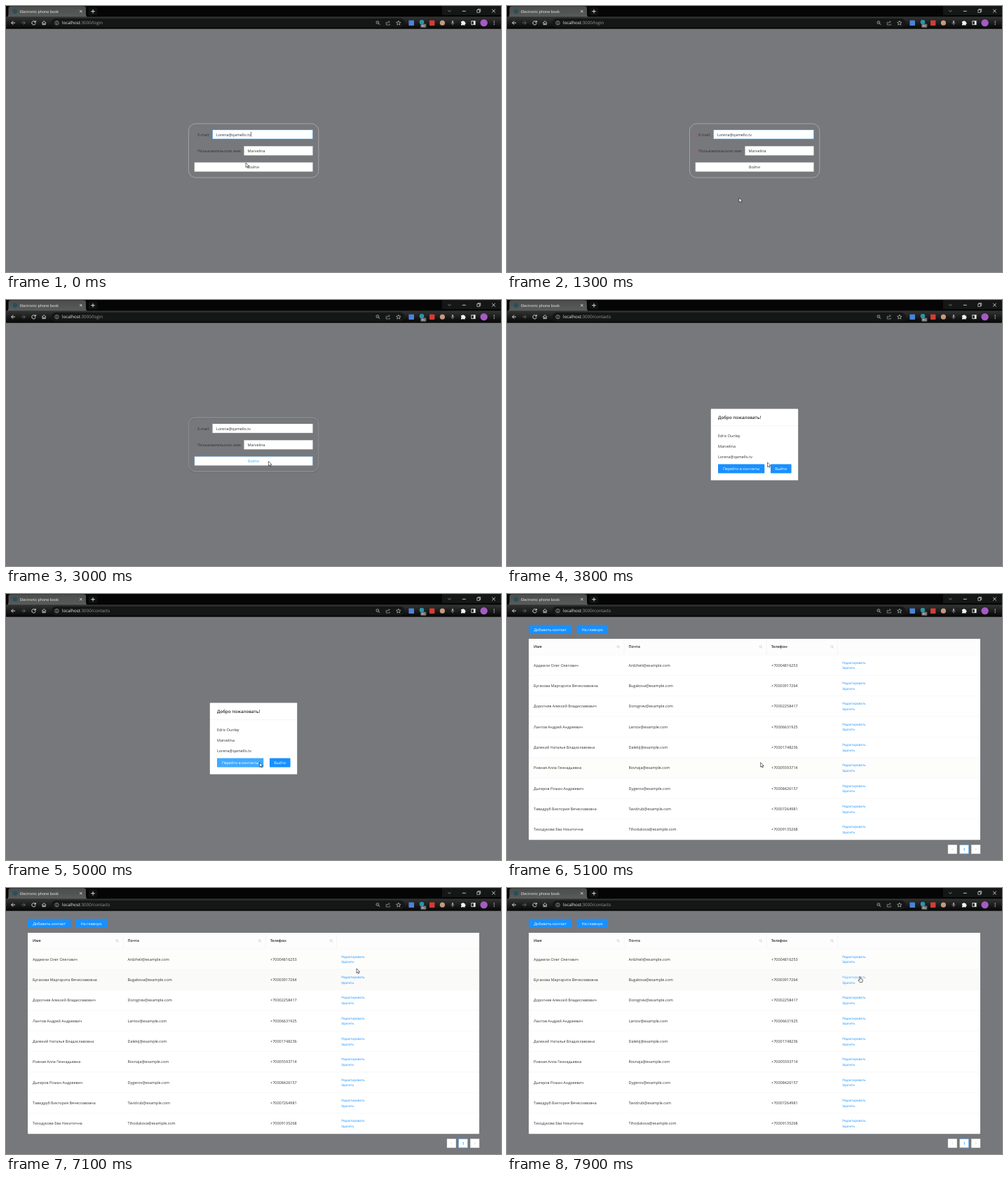
Animation, 706 px wide and 380 px high, one loop 8000 ms. Source, as an HTML page:

```html
<!DOCTYPE html>
<html lang="ru">
<head>
<meta charset="utf-8">
<title>Electronic phone book</title>
<style>
html, body { margin: 0; width: 100%; height: 100%; overflow: hidden; background: #77787c; }
svg { display: block; width: 100%; height: 100%; }
text { font-family: "Open Sans", "Noto Sans", sans-serif; text-rendering: geometricPrecision; white-space: pre; }
</style>
</head>
<body>
<svg id="stage" viewBox="0 0 706 380" xmlns="http://www.w3.org/2000/svg"></svg>
<script>
const LOOP = 8000, STEP = 100;
const INK = '#303030', BLUE = '#1890ff', LIGHT_BLUE = '#40a9ff';
const ROW_TOP = 87, ROW_H = 29.33;

const people = [
  ['Арджели Олег Олегович', 'Ardzheli', '+70004816253'],
  ['Бугакова Маргарита Вячеславовна', 'Bugakova', '+70003917264'],
  ['Дорогнев Алексей Владиславович', 'Dorognev', '+70002258417'],
  ['Лантов Андрей Андреевич', 'Lantov', '+70006631925'],
  ['Далекий Наталья Владиславовна', 'Dalekij', '+70001748236'],
  ['Ровная Алла Геннадьевна', 'Rovnaja', '+70005593714'],
  ['Дыгеров Роман Андреевич', 'Dygerov', '+70008426157'],
  ['Тавидруб Виктория Вячеславовна', 'Tavidrub', '+70007264981'],
  ['Тиходукова Ева Никитична', 'Tihodukova', '+70009135268']
];
const user = { name: 'Edric Dunley', login: 'Marvelina', mail: 'Lorena@qamello.tv' };

// Pointer path: time, x, y
const path = [
  [100, 342, 224], [300, 349, 231], [400, 350, 240], [700, 335, 267], [900, 331, 274],
  [1400, 331, 274], [1500, 319, 278], [1700, 182, 313], [1800, 136, 317], [1900, 150, 306],
  [2100, 292, 264], [2300, 390, 240], [2400, 384, 234], [2600, 374.4, 230.4],
  [3400, 374.4, 230.4], [3600, 371.5, 232], [4000, 371.5, 232], [4200, 364, 242], [4300, 361.5, 244],
  [4500, 361.7, 240.7], [5800, 361.7, 240.7], [6000, 370, 237], [6200, 396, 223],
  [6400, 421.5, 205.2], [6700, 474, 167], [6900, 495, 143], [7100, 500, 115], [7300, 499, 99],
  [7500, 499, 99], [7600, 500, 103], [7900, 503.5, 127]
];

function attrs(o) {
  return Object.entries(o).map(([k, v]) => ` ${k}="${v}"`).join('');
}
function rect(x, y, width, height, fill, more = {}) {
  return `<rect${attrs({ x, y, width, height, fill, ...more })}/>`;
}
function circle(cx, cy, r, fill, more = {}) {
  return `<circle${attrs({ cx, cy, r, fill, ...more })}/>`;
}
function text(x, y, str, size = 5.43, fill = INK, more = {}) {
  return `<text${attrs({ x, y, 'font-size': size, fill, ...more })}>${str}</text>`;
}
function line(d, stroke, width = 0.9, more = {}) {
  return `<path${attrs({ d, stroke, 'stroke-width': width, fill: 'none', ...more })}/>`;
}
function group(id, content) {
  return `<g id="${id}">${content}</g>`;
}
function fade(id, from, to) {
  return `<linearGradient id="${id}" x2="0" y2="1"><stop stop-color="${from}"/><stop offset="1" stop-color="${to}"/></linearGradient>`;
}
const mid = { 'text-anchor': 'middle' };

function lens(x, y, color, s = 1) {
  return circle(x - 0.4 * s, y - 0.4 * s, 1.5 * s, 'none', { stroke: color, 'stroke-width': 0.5 * s }) +
    line(`M${x + 0.7 * s} ${y + 0.7 * s}l${1.5 * s} ${1.5 * s}`, color, 0.6 * s);
}

function button(x, y, w, label, id) {
  return rect(x, y, w, 12.9, BLUE, { rx: 0.8, id }) +
    text(x + w / 2, y + 8.4, label, 5.35, '#fff', mid);
}

function tabStrip() {
  const w = '#eee';
  return rect(0, 0, 706, 16, '#050505') + rect(622, 0, 84, 13, '#151616') +
    '<path d="M1 16Q3.5 15 3.5 12V3.5Q3.5 .3 7 .3H110.5Q114 .3 114 3.5V12Q114 15 116.5 16Z" fill="url(#tab)"/>' +
    circle(12.8, 7.6, 3.3, '#26505c') +
    text(20, 9.6, 'Electronic phone book', 5.3, '#f2f2f2') +
    line('M105.1 5.9l3.4 3.4m0-3.4l-3.4 3.4', w, 0.8) +
    rect(117.5, 2, 13, 11.5, '#0f1010', { rx: 3 }) +
    line('M121.2 7.7h5.6m-2.8-2.8v5.6', w, 0.9) +
    line('M630.2 6l2.2 2.2l2.2-2.2', '#bbb', 0.7) +
    line('M650.8 7.3h5', w, 0.8) +
    line('M671.8 5.6h3.7v3.7h-3.7zM673 5.4v-1h3.7v3.8h-1', w, 0.65) +
    line('M693.2 4.8l4.6 4.6m0-4.6l-4.6 4.6', w, 0.8);
}

function toolbar() {
  const w = '#eee', g = '#aaa';
  return rect(0, 15.3, 706, 17.4, 'url(#bar)') + rect(64.5, 17.8, 504, 12.6, '#151616', { rx: 6.3 }) +
    line('M13 24.1H7.6m2.6-2.6l-2.6 2.6l2.6 2.6', w) +
    line('M22 24.1h5.4m-2.6-2.6l2.6 2.6l-2.6 2.6', '#6c6c6c') +
    line('M41.7 22.6a2.7 2.7 0 1 0 .5 2.1M42.3 20.9v2.2h-2.2', w) +
    line('M51.1 24.3l3-2.8l3 2.8M52 23.6v3.2h1.4v-1.8h1.4v1.8h1.4v-3.2', w, 0.75) +
    circle(72.5, 24.1, 2.7, 'none', { stroke: '#ccc', 'stroke-width': 0.6 }) +
    line('M72.5 23.7v1.9m0-3.2v.7', '#ccc', 0.7) +
    `<text id="url" x="80" y="26.4" font-size="6.2" fill="#f2f2f2">localhost<tspan fill="#9a9a9a">:3000<tspan id="route"></tspan></tspan></text>` +
    lens(530.4, 24, '#ccc', 1.3) + line('M529.2 23.5h1.4', '#ccc', 0.5) +
    line('M543.4 23.2h-1.2v3.8h5.2v-1.6M543.6 25q.4-2.4 3.2-2.4m-1.2-1.5l1.5 1.5l-1.5 1.5', g, 0.65) +
    line('M559.8 21l.9 2.1l2.3.2l-1.8 1.5l.6 2.3l-2-1.3l-2 1.3l.6-2.3l-1.8-1.5l2.3-.2z', '#ddd', 0.6) +
    rect(574.4, 20.4, 7.6, 7.6, '#4a83d8', { rx: 0.8 }) +
    circle(593, 23.1, 3.3, '#2a95a8') +
    rect(591.3, 25.6, 8, 5.2, '#6b6f72', { rx: 0.8 }) + text(595.3, 29.8, 'PC', 4, '#fff', mid) +
    rect(604, 20.6, 7.4, 7.4, '#d43c34', { rx: 0.8 }) +
    circle(622.4, 24.2, 3.6, '#c69a7c') +
    rect(635.9, 20.8, 2.2, 4, '#9c9c9c', { rx: 1.1 }) +
    line('M634.8 23.6a2.2 2.2 0 0 0 4.4 0M637 25.8v1.7', '#9c9c9c', 0.6) +
    '<path d="M649 22h1.7a1.1 1.1 0 1 1 2.2 0h1.7v1.7a1.1 1.1 0 1 1 0 2.2v1.6h-2a1 1 0 0 0-1.8 0H649v-1.8a1.1 1.1 0 0 0 0-2z" fill="#f2f2f2"/>' +
    rect(663.9, 21.5, 5.2, 5.2, 'none', { stroke: w, 'stroke-width': 0.8 }) + rect(666.8, 21.5, 2.3, 5.2, w) +
    circle(681.6, 24.1, 5.2, '#a55bc4') +
    [21.9, 24.1, 26.3].map(y => circle(696.2, y, 0.65, w)).join('');
}

function loginPage() {
  const field = (x, y, w, id) => rect(x, y, w, 12.9, '#fff', { id, stroke: '#d9d9d9', 'stroke-width': 0.3 });
  const star = y => text(268.7, y + 0.6, '*', 5.4, '#d9485a');
  const card = (y, more) => rect(260.4, y, 185.4, 77, 'none', { rx: 10, ...more });
  return card(169.2, { id: 'shade', stroke: '#5f6064', 'stroke-width': 1.6, opacity: 0.5 }) +
    card(168.1, { id: 'card', 'stroke-width': 0.7 }) +
    star(185.5) + text(273.2, 185.5, 'E-mail:') +
    rect(293.8, 176.4, 144.4, 14.1, BLUE, { id: 'glow', opacity: 0.35 }) +
    field(294.7, 177, 142.7, 'mail') + text(299.9, 185.5, user.mail) +
    rect(349.1, 179.6, 0.5, 7.2, '#000', { id: 'caret' }) +
    star(208.8) + text(273.2, 208.8, 'Пользовательское имя:') +
    field(339.6, 200.3, 97.8, 'login') + text(344.6, 208.8, user.login) +
    field(268.9, 223.6, 168.5, 'enter') + text(353, 231.9, 'Войти', 5.4, INK, { ...mid, id: 'enterText' });
}

function welcomePage() {
  return rect(290.8, 155.4, 124.4, 102.2, '#fff', { rx: 0.6 }) +
    text(301, 170, 'Добро пожаловать!', 6.22, '#262626', { 'font-weight': 600 }) +
    line('M291 179.6h124', '#ececec', 0.5) +
    [user.name, user.login, user.mail].map((s, i) => text(301, 195.9 + 15 * i, s)).join('') +
    button(301, 234.6, 66.3, 'Перейти в контакты', 'go') +
    button(376, 234.6, 29.6, 'Выйти', 'quit');
}

function contactsPage() {
  const heads = [['Имя', 38, 158.7], ['Почта', 173.5, 362], ['Телефон', 376.7, 463.7]];
  const pager = x => rect(x, 358.4, 12.8, 12.6, '#fff', { stroke: '#d9d9d9', 'stroke-width': 0.4 });
  let out = button(31, 44.1, 61.4, 'Добавить контакт', 'add') + button(99.5, 44.1, 44.6, 'На главную', 'home') +
    rect(31, 64, 644, 287.2, '#fff', { rx: 0.8 }) + rect(31, 64, 644, 23, '#fdfdfd');
  for (const [label, x, iconX] of heads) {
    out += text(x, 77.4, label, 5.4, '#262626', { 'font-weight': 600 }) + lens(iconX, 75.4, '#b5b5b5');
  }
  out += line('M167 66v20M370 66v20M471.5 66v20', '#eaeaea', 0.5);
  people.forEach(([name, mail, phone], i) => {
    const y = ROW_TOP + ROW_H * i;
    out += rect(31, y, 644, ROW_H, '#f8f8f7', { id: 'row' + i }) + line(`M31 ${y}h644`, '#f0f0f0', 0.5) +
      text(38, y + 16.6, name, 5.38) + text(173.5, y + 16.6, mail + '@example.com') +
      text(377, y + 16.6, phone, 5.5) +
      text(478.2, y + 12.7, 'Редактировать', 4.6, BLUE, { id: 'edit' + i }) +
      text(478.2, y + 20.4, 'Удалить', 4.6, BLUE);
  });
  return out + pager(629) + pager(645.6) + pager(662.2) +
    rect(645.6, 358.4, 12.8, 12.6, '#fff', { stroke: BLUE, 'stroke-width': 0.5 }) +
    text(652, 366.7, '1', 5.4, BLUE, { ...mid, 'font-weight': 600 }) +
    line('M636.2 363l-1.6 1.7l1.6 1.7M667.8 363l1.6 1.7l-1.6 1.7', '#bdbdbd', 0.5);
}

function pointer() {
  const skin = 'fill="#fff" stroke="#111" stroke-width=".6" stroke-linejoin="round"';
  return `<path id="arrow" ${skin} d="M0 0V6.5L1.5 5.2L2.5 7.4L3.6 6.9L2.6 4.8H4.6Z"/>` +
    `<path id="hand" ${skin} d="M-.7 0Q0-.9.7 0V2.8L3.2 3.3Q4 3.6 3.9 4.6L3.3 7.6H-.6L-2.4 4.8Q-2.4 3.8-1.4 4.2L-.7 4.9Z"/>`;
}

const stage = document.getElementById('stage');
stage.innerHTML =
  `<defs>${fade('tab', '#4a4d4c', '#5a5c5b')}${fade('bar', '#333434', '#050505')}</defs>` +
  rect(0, 0, 706, 380, '#77787c') + tabStrip() + toolbar() +
  group('loginPage', loginPage()) + group('welcomePage', welcomePage()) +
  group('contactsPage', contactsPage()) + group('pointer', pointer());

const $ = id => document.getElementById(id);
const set = (id, name, value) => $(id).setAttribute(name, value);
const show = (id, on) => set(id, 'display', on ? 'inline' : 'none');

function pointerAt(t) {
  const i = path.findIndex(p => p[0] >= t);
  if (i === 0) return path[0].slice(1);
  if (i < 0) return path[path.length - 1].slice(1);
  const [t0, x0, y0] = path[i - 1], [t1, x1, y1] = path[i];
  const k = (t - t0) / (t1 - t0);
  return [x0 + (x1 - x0) * k, y0 + (y1 - y0) * k];
}

function mix(a, b, k) {
  return `rgb(${a.map((v, i) => Math.round(v + (b[i] - v) * k))})`;
}

// Share of the last 300 ms for which a condition held
function eased(t, test) {
  return [0, 1, 2].filter(n => test(t - n * STEP)).length / 3;
}

const rowAt = t => t < 5100 ? -1 : Math.floor((pointerAt(t)[1] - ROW_TOP) / ROW_H);

function draw(t) {
  const [x, y] = pointerAt(t);
  const login = t < 3100, contacts = t >= 5100;
  show('loginPage', login);
  show('welcomePage', !login && !contacts);
  show('contactsPage', contacts);
  $('route').textContent = login ? '/login' : '/contacts';

  const focus = t < 3000;
  show('glow', focus);
  show('shade', !focus);
  set('card', 'stroke', focus ? '#b6b7ba' : '#a6a7aa');
  set('mail', 'stroke', focus ? LIGHT_BLUE : '#d9d9d9');
  show('caret', t < 2800 && Math.floor((t - 240) / 530) & 1);

  const hot = eased(t, s => s >= 2400);
  set('enter', 'stroke', mix([217, 217, 217], [64, 169, 255], hot));
  set('enterText', 'fill', mix([48, 48, 48], [64, 169, 255], hot));
  set('go', 'fill', mix([24, 144, 255], [64, 169, 255], eased(t, s => s >= 4200)));

  let onLink = false;
  people.forEach((_, i) => {
    const top = ROW_TOP + ROW_H * i;
    const over = contacts && x > 478 && x < 512 && Math.abs(y - top - 11) < 3.2;
    onLink = onLink || over;
    set('row' + i, 'opacity', eased(t, s => rowAt(s) === i));
    set('edit' + i, 'fill', over ? LIGHT_BLUE : BLUE);
  });
  show('arrow', !onLink);
  show('hand', onLink);
  set('pointer', 'transform', `translate(${x} ${y})`);
}

const start = performance.now();
function tick() {
  const t = (performance.now() - start) % LOOP;
  draw(Math.floor(t / STEP) * STEP);
  requestAnimationFrame(tick);
}
tick();
</script>
</body>
</html>
```
